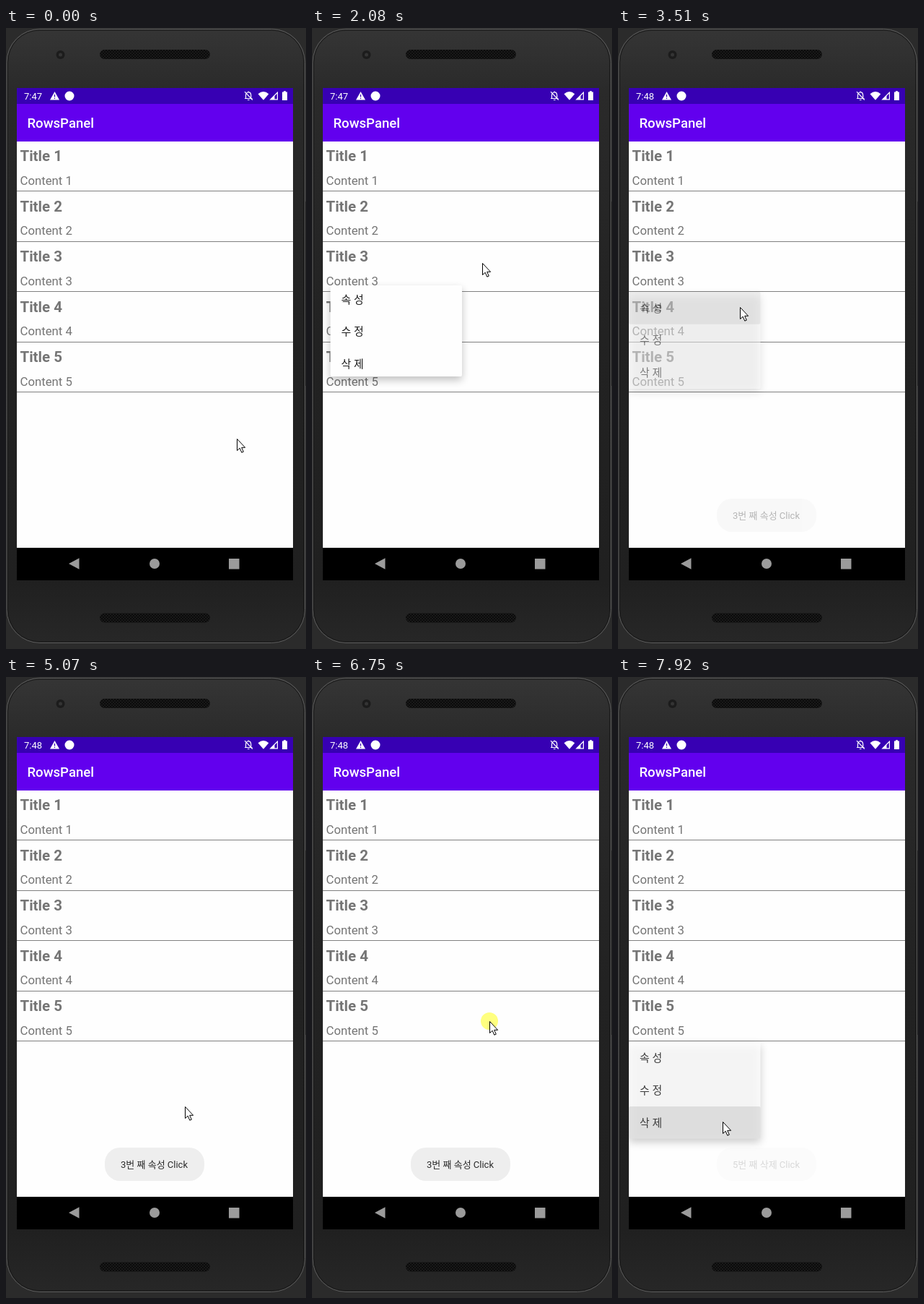
An HTML page for the animation above (7.99 s loop, 416x859 px).

```html
<!DOCTYPE html>
<html lang="ko">
<head>
<meta charset="utf-8">
<title>Popup menu</title>
<style>
html, body { margin: 0; width: 100%; height: 100%; overflow: hidden; background: #2b2b2b; }
svg { display: block; width: 416px; height: 859px; }
text { font-family: Roboto, 'Noto Sans CJK KR', 'Noto Sans CJK', sans-serif; }
</style>
</head>
<body>
<svg viewBox="0 0 416 859">
  <defs>
    <linearGradient id="body" x1="0" y1="0" x2="0" y2="1">
      <stop offset="0" stop-color="#353535"/>
      <stop offset=".1" stop-color="#2a2a2a"/>
      <stop offset=".5" stop-color="#222"/>
      <stop offset=".9" stop-color="#202020"/>
      <stop offset="1" stop-color="#272727"/>
    </linearGradient>
    <pattern id="mesh" width="4" height="4" patternUnits="userSpaceOnUse">
      <rect width="4" height="4" fill="#191919"/>
      <circle cx="1" cy="1" r="1" fill="#060606"/>
      <circle cx="3" cy="3" r="1" fill="#060606"/>
    </pattern>
    <clipPath id="screen"><rect x="15" y="157" width="383" height="562"/></clipPath>
    <filter id="blur" x="-20%" y="-25%" width="140%" height="150%"><feGaussianBlur stdDeviation="6"/></filter>
  </defs>

  <!-- phone -->
  <rect width="416" height="859" fill="#2b2b2b"/>
  <rect x="1" y="1.5" width="413.5" height="849" rx="46" fill="url(#body)" stroke="#5c5c5c"/>
  <rect x="2.5" y="3" width="410.5" height="846" rx="44.5" fill="none" stroke="#191919"/>
  <path d="M415.5 240V495" stroke="#171717"/>
  <circle cx="75.500" cy="37" r="6" fill="#1c1c1c"/>
  <circle cx="75.500" cy="37" r="2.500" fill="#343434"/>
  <rect x="130" y="30" width="153" height="13" rx="6.500" fill="url(#mesh)"/>
  <rect x="130" y="809.500" width="153" height="13" rx="6.500" fill="url(#mesh)"/>

  <!-- bars -->
  <rect x="15" y="83" width="383" height="22" fill="#3700b3"/>
  <rect x="15" y="105" width="383" height="52" fill="#6200ee"/>
  <rect x="15" y="157" width="383" height="562" fill="#fefefe"/>
  <rect x="15" y="719" width="383" height="45" fill="#000"/>
  <text id="clock" x="25" y="98.800" font-size="13" fill="#fff"></text>
  <text x="29.500" y="138" font-size="18.600" font-weight="500" fill="#fff">RowsPanel</text>

  <g fill="#fff">
    <path fill-rule="evenodd" d="M67.500 88L74 99.500H61ZM66.900 92V95.500H68.100V92ZM66.900 96.700V98H68.100V96.700Z"/>
    <circle cx="88" cy="94" r="6.500"/>
    <path d="M349.500 91.200Q357 85 364.300 91.200L357 99.800Z"/>
    <path fill-rule="evenodd" d="M377 87.800V99.500H365.300ZM375.800 90.800L372.500 94V98.300H375.800Z"/>
    <path d="M383 88.500H385V87.300H388V88.500H390V100H383Z"/>
  </g>
  <g fill="none" stroke="#fff" stroke-width="1.200">
    <path d="M332.500 97.500V93Q332.500 89.500 336 89T339.700 93V97.500ZM331 97.500H341.500M331 88.200L341.800 99.500"/>
    <path d="M335 99.500H337.500M336 87.500V89"/>
  </g>
  <g fill="#9b9b9b">
    <path d="M87 741L101.500 733.200V748.800Z"/>
    <circle cx="206" cy="741" r="7"/>
    <rect x="309" y="734" width="14.500" height="14.500"/>
  </g>

  <g id="list"></g>

  <g id="toast">
    <rect x="137" y="651" width="138" height="46" rx="21" fill="#eee"/>
    <text id="note" x="159" y="679" font-size="13" fill="#2b2b2b"></text>
  </g>

  <g id="popup" clip-path="url(#screen)">
    <rect id="shade" width="182.500" rx="2" fill="#000" filter="url(#blur)"/>
    <g id="panel">
      <rect id="sheet" width="182.500" rx="2" fill="#fefefe"/>
      <rect id="press" width="182.500" height="44.700" rx="2" fill="#000" fill-opacity=".11"/>
      <g id="items"></g>
    </g>
  </g>

  <circle id="spot" r="12" fill="#ff0" fill-opacity=".5"/>
  <path id="arrow" d="M.5.500V16.500L4.200 13.200 6.800 19.200 9.300 18.100 6.700 12.300H11.600Z" fill="#fff" stroke="#000" stroke-linejoin="round"/>
</svg>
<script>
const LOOP = 7990, STEP = 70, ROW = 69.5, ITEM = 44.7;
const $ = id => document.getElementById(id);
const clamp = v => Math.max(0, Math.min(1, v));

function add(parent, tag, attrs, text) {
  const el = document.createElementNS('http://www.w3.org/2000/svg', tag);
  set(el, attrs);
  if (text) el.textContent = text;
  parent.appendChild(el);
}
function set(el, attrs) {
  for (const k in attrs) el.setAttribute(k, attrs[k]);
}

for (let i = 0; i < 5; i++) {
  const y = i * ROW;
  add($('list'), 'text', { x: 19.5, y: 184 + y, 'font-size': 20.5, 'font-weight': 700, fill: '#757575' }, 'Title ' + (i + 1));
  add($('list'), 'text', { x: 19.5, y: 216.5 + y, 'font-size': 16.76, fill: '#757575' }, 'Content ' + (i + 1));
  add($('list'), 'rect', { x: 15, y: Math.floor(225.8 + y), width: 383, height: 1, fill: '#808080' });
}
['속 성', '수 정', '삭 제'].forEach((s, i) =>
  add($('items'), 'text', { x: 15, y: 27.6 + i * ITEM, 'font-size': 14.9, fill: '#1c1c1c' }, s));

// moments at which the stepped clock restarts
const starts = [0, 500, 1340, 2080, 2620, 3450, 3510, 3860, 4520, 5070, 5530, 6420, 7240, 7920];

// pointer: time, x, y, eased
const path = [
  [0, 320, 568], [430, 320, 568], [1270, 245, 335, 1], [1410, 245, 326], [1970, 245, 326],
  [2080, 236, 325], [2550, 236, 325], [3170, 170, 389, 1], [3380, 169, 386], [4450, 169, 386],
  [4870, 247, 593, 1], [5000, 247, 593], [5070, 248, 594], [5270, 249, 593], [5460, 249, 592],
  [6020, 246, 476, 1], [6910, 246, 476], [6980, 247, 490], [7050, 236, 516], [7170, 171, 579],
  [7310, 145, 606], [7400, 145, 606], [7590, 145, 615, 1], [LOOP, 145, 615]
];
const clicks = [[1480, 2040], [3240, 3450], [6420, 6950], [7660, 7900]];
const menus = [
  { open: 2080, tap: 3450, y: 365, item: 0 },
  { open: 6980, tap: 7920, y: 504.5, item: 2 }
];

function snap(t) {
  const s = starts.filter(v => v <= t).pop();
  return s + Math.floor((t - s) / STEP) * STEP;
}

function pointer(t) {
  const i = path.findIndex(p => p[0] > t), a = path[i - 1], b = path[i];
  let k = (t - a[0]) / (b[0] - a[0]);
  if (b[3]) k = k * k * (3 - 2 * k);
  return [1, 2].map(n => Math.round(a[n] + (b[n] - a[n]) * k));
}

function drawMenu(t) {
  const m = menus.find(v => t >= v.open && t < v.tap + 200);
  const alpha = m ? clamp(1 - (t - m.tap + 35) / 190) : 0;
  $('popup').style.display = alpha ? '' : 'none';
  if (!alpha) return;
  const late = clamp(1 - (t - m.open) / 140), shift = late * late;
  const x = 15 + 10.5 * shift, y = m.y - 12 * shift;
  const box = { x, y: y + 3 * shift, height: 134 - 8 * shift };
  set($('sheet'), box);
  set($('shade'), { x, y: box.y + 5, height: box.height, opacity: .24 * alpha });
  set($('items'), { transform: `translate(${x} ${y})` });
  set($('press'), { x, y: y + m.item * ITEM, opacity: t >= m.tap ? 1 : 0 });
  set($('panel'), { opacity: alpha });
}

function drawToast(t) {
  const again = t >= menus[1].tap;
  const rise = tap => clamp((t - tap + 60) / 350);
  const alpha = again ? rise(menus[1].tap)
    : t < menus[0].tap ? 0
    : Math.min(rise(menus[0].tap), clamp(1 - (t - 7110) / 310));
  $('note').textContent = again ? '5번 째 삭제 Click' : '3번 째 속성 Click';
  set($('toast'), { opacity: alpha });
}

function draw(time) {
  const t = snap(time % LOOP), [x, y] = pointer(t);
  $('clock').textContent = t < 3040 ? '7:47' : '7:48';
  drawToast(t);
  drawMenu(t);
  set($('arrow'), { transform: `translate(${x} ${y})` });
  set($('spot'), { cx: x, cy: y, opacity: clicks.some(c => t >= c[0] && t < c[1]) ? 1 : 0 });
}

let begin;
function tick(now) {
  if (begin === undefined) begin = now;
  draw(now - begin);
  requestAnimationFrame(tick);
}
draw(0);
requestAnimationFrame(tick);
</script>
</body>
</html>
```
